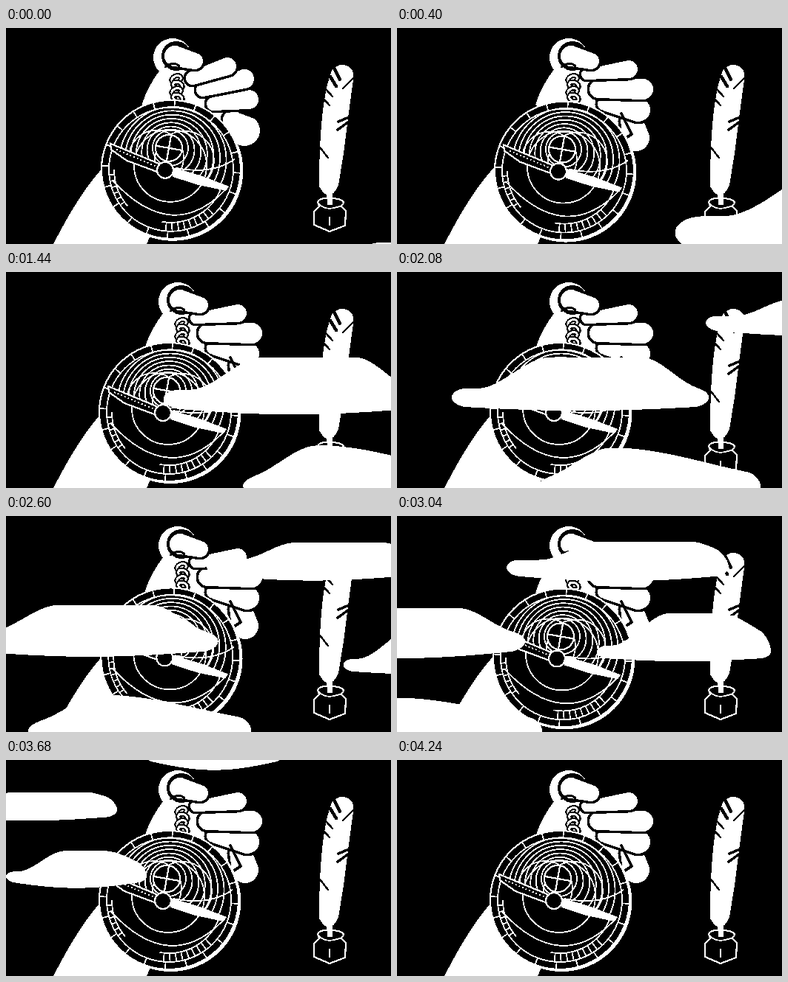
An HTML page that plays this animation: 520x293 px, repeating every 4.32 s.

```html
<!DOCTYPE html>
<html lang="en">
<head>
<meta charset="utf-8">
<title>Pocket watch, quill and drifting clouds</title>
<style>
html, body { margin: 0; width: 100%; height: 100%; overflow: hidden; background: #000; }
svg { display: block; width: 520px; height: 293px; shape-rendering: crispEdges; }
.ink { fill: none; stroke: #000; stroke-linecap: round; }
.line { fill: none; stroke: #fff; stroke-width: 1.8; }
.plate { fill: #000; stroke: #fff; stroke-width: 2.2; }
.white { fill: #fff; }
.skin { fill: #fff; stroke: #000; stroke-width: 7; paint-order: stroke; }
</style>
</head>
<body>
<svg id="stage" viewBox="0 0 520 293"></svg>
<script>
const LOOP = 4320;
const stage = document.getElementById('stage');

const circle = (x, y, r, cls = 'line') => `<circle cx="${x}" cy="${y}" r="${r}" class="${cls}"/>`;
const path = (d, cls = 'line') => `<path d="${d}" class="${cls}"/>`;
const ink = (d, width) => `<path d="${d}" class="ink" stroke-width="${width}"/>`;

// Finger: a capsule tapering from radius r1 to r2
function finger(x1, y1, r1, x2, y2, r2) {
  const a = Math.atan2(y2 - y1, x2 - x1), nx = -Math.sin(a), ny = Math.cos(a);
  return path(`M${x1 + nx * r1} ${y1 + ny * r1}A${r1} ${r1} 0 0 1 ${x1 - nx * r1} ${y1 - ny * r1}
    L${x2 - nx * r2} ${y2 - ny * r2}A${r2} ${r2} 0 0 1 ${x2 + nx * r2} ${y2 + ny * r2}Z`, 'skin');
}

function chain(x, y) {
  let s = '';
  for (let i = 0; i < 4; i++) {
    const side = i % 2 ? 1 : -1, cy = y + i * 8.5;
    const link = `cx="${x + side}" cy="${cy}" rx="6.5" ry="4.5" transform="rotate(${side * 25} ${x} ${cy})" fill="none"`;
    s += `<ellipse ${link} stroke="#000" stroke-width="7"/><ellipse ${link} stroke="#fff" stroke-width="3"/>`;
  }
  return s;
}

function hand(ringX, fingers, crease = '') {
  const shift = ringX - 232;
  return path('M64 293Q100 222 134 186L230 200L190 293Z', 'white')
    + `<g transform="translate(${shift / 2})">${path('M187 104Q195 78 213 55L250 52L278 98L302 112L310 165L250 160Z', 'white')}</g>`
    + circle(ringX, 40, 26, 'white') + circle(ringX + 5, 38, 20, 'plate" style="stroke:none')
    + fingers.map(f => finger(...f)).join('')
    + finger(ringX + 3, 38, 14, ringX + 30, 45, 11)
    + ink(`M${ringX - 10} 53Q${ringX + 2} 44 ${ringX + 9} 52`, 3)
    + crease + chain(ringX + 6, 69);
}

const openHand = hand(225, [
  [306, 125, 13, 322, 139, 21],
  [280, 103, 9, 328, 97, 13],
  [266, 84, 9, 322, 69, 13],
  [252, 68, 9, 299, 52, 12]
]);
const restHand = hand(232, [
  [317, 126, 15, 323, 149, 18],
  [280, 103, 9, 326, 111, 16],
  [272, 83, 12, 332, 83, 14],
  [256, 63, 7, 313, 56, 12]
], ink('M303 116L317 144L308 150', 4));

function watch() {
  const cx = 220, cy = 190;
  const polar = (r, deg) => {
    const a = deg * Math.PI / 180;
    return `${cx + r * Math.cos(a)} ${cy + r * Math.sin(a)}`;
  };
  const ticks = (from, to, step, r1, r2) => {
    let d = '';
    for (let a = from; a <= to; a += step) d += `M${polar(r1, a)}L${polar(r2, a)}`;
    return path(d);
  };
  let orbits = circle(238, 178, 40) + circle(200, 174, 37);
  for (let i = 0; i < 7; i++) orbits += circle(219 + i * 0.6, 161 + i * 2.7, 24 + i * 8);
  return circle(222.3, 192, 95, 'white') + circle(cx, cy, 94, 'plate') + circle(cx, cy, 84)
    + ticks(3, 360, 18, 84, 94) + ticks(47, 99, 6, 72, 84) + ticks(145, 178, 6, 77, 84)
    + path(`M${polar(72, 20)}A72 72 0 0 1 ${polar(72, 100)}M${polar(77, 140)}A77 77 0 0 1 ${polar(77, 180)}`)
    + `<clipPath id="upper"><path d="M120 90H320V205L298 214L212 190L138 158Z"/></clipPath>
      <g clip-path="url(#upper)">${orbits}</g>`
    + circle(219, 185, 49) + path('M142 206Q222 292 294 217M226 188Q275 198 306 176')
    + circle(217, 161, 18, 'plate') + path('M200 158L234 164M220 144L214 178', 'plate')
    + path('M138 155L203 182V194L160 178L139 163Z', 'plate')
    + path('M146 163L200 186', 'line" stroke-dasharray="2 3')
    + path('M222 187L262 199L298 213L294 219L256 211L222 200Z', 'white')
    + circle(212, 191, 11, 'plate');
}

function quill() {
  return path('M421 236Q423 231 433 231H441Q455 232 456 237Q454 242 452 241L459 248L458 268L437 276L416 267V249L423 242Z', 'plate')
    + path('M422 238Q430 247 443 244T454 240M437 256V268')
    + path('M433 222H441V240H434Z', 'white')
    + path('M423 215Q423 100 440 58Q452 44 465 54Q471 60 469 70Q462 120 456 170L449 213Q437 240 423 215Z', 'white')
    + ink('M438 66L446 79M444 56L451 70', 4.5)
    + ink('M455 82L469 68M432 83L441 93M428 95L437 105M424 162L435 176', 2.5)
    + ink('M449 127L463 121M448 138L463 127', 3.5);
}

// rise and fall: stretches of the width where the top climbs and sinks
// keys: [time, left, middle y, width, hump, sag]
const clouds = [
  { rise: [0.1, 0.38], fall: [0.74, 0.98], keys: [
    [0, 470, 315, 700, 100, 50], [800, 281, 240, 560, 65, 26], [1440, 213, 172, 350, 44, 9],
    [2080, 74, 170, 347, 42, 6], [3040, -174, 170, 347, 33, 11]] },
  { rise: [0, 0.33], fall: [0.34, 1.2], keys: [
    [800, 490, 350, 305, 44, 30], [1440, 320, 290, 305, 44, 30],
    [2080, 190, 291, 301, 42, 30], [3040, -105, 291, 301, 34, 30]] },
  { rise: [0.15, 0.42], fall: [0.82, 1.1], keys: [
    [2080, 417, 69, 270, 22, 8], [3040, 148, 70, 300, 25, 8], [3680, -90, 68, 240, 16, 6]] },
  { rise: [0.08, 0.42], fall: [0.7, 1.15], keys: [
    [3040, 270, 184, 235, 44, 5], [3680, 0, 158, 190, 28, 9]] },
  { rise: [0, 0.2], fall: [0.8, 1], keys: [
    [3040, 530, 10, 190, 10, 14], [3400, 281, 6, 190, 10, 14], [3680, 186, -7, 190, 10, 14]] }
];

const clamp = k => Math.min(1, Math.max(0, k));
const ramp = ([a, b], u) => { const k = clamp((u - a) / (b - a)); return k * k * (3 - 2 * k); };

function cloudPath({ rise, fall }, [x, y, w, hump, sag]) {
  const top = [], bottom = [], tip = w * 0.035;
  for (let i = 0; i <= 100; i++) {
    const u = (1 - Math.cos(Math.PI * i / 100)) / 2;
    const cap = Math.sqrt(1 - (1 - clamp(Math.min(u, 1 - u) / 0.06)) ** 2);
    const px = (x + u * w).toFixed(1);
    top.push(px + ' ' + (y - cap * (tip + hump * ramp(rise, u) * (1 - ramp(fall, u)))).toFixed(1));
    bottom.unshift(px + ' ' + (y + cap * (tip + sag * Math.sin(Math.PI * u))).toFixed(1));
  }
  return 'M' + top.concat(bottom).join('L') + 'Z';
}

// Between keys linear; outside them the end speed carries on, gathering pace at the exit
function cloudPose(keys, t) {
  const last = keys.length - 1;
  const i = Math.max(1, keys.findIndex((key, n) => t < key[0] || n === last));
  const [a, b] = [keys[i - 1], keys[i]], k = (t - a[0]) / (b[0] - a[0]);
  const pose = a.slice(1).map((v, n) => v + (b[n + 1] - v) * (n < 2 ? k : clamp(k)));
  pose[0] -= 0.0016 * Math.max(0, t - keys[last][0]) ** 2;
  return pose;
}

// [time, distance] of the watch swinging on its chain
const swing = [[0, 3], [800, 9], [1440, 0], [2080, 0], [3040, 4], [3680, 0], [LOOP, 0]];

function swingAt(t) {
  const i = swing.findIndex(key => t < key[0]);
  const [[t0, d0], [t1, d1]] = [swing[i - 1], swing[i]];
  return d0 + (d1 - d0) * ramp([t0, t1], t);
}

stage.innerHTML = `<rect width="520" height="293"/>
  <g id="open">${openHand}</g><g id="rest">${restHand}</g>
  <g id="watch">${watch()}</g>${quill()}
  ${clouds.map(() => '<path class="white cloud"/>').join('')}`;

const [openEl, restEl, watchEl] = ['open', 'rest', 'watch'].map(id => document.getElementById(id));
const cloudEls = stage.querySelectorAll('.cloud');

function draw(time) {
  const step = time % LOOP < 2280 ? 80 : 40;
  const t = Math.min(Math.floor(time % LOOP / step) * step, 4240);
  const isOpen = t < 240;
  openEl.style.display = isOpen ? '' : 'none';
  restEl.style.display = isOpen ? 'none' : '';
  const d = swingAt(t);
  watchEl.setAttribute('transform', `translate(${d} ${d * 0.6})`);
  clouds.forEach((c, i) => cloudEls[i].setAttribute('d', cloudPath(c, cloudPose(c.keys, t))));
}

const start = performance.now();
function tick() {
  draw(performance.now() - start);
  requestAnimationFrame(tick);
}
tick();
</script>
</body>
</html>
```
